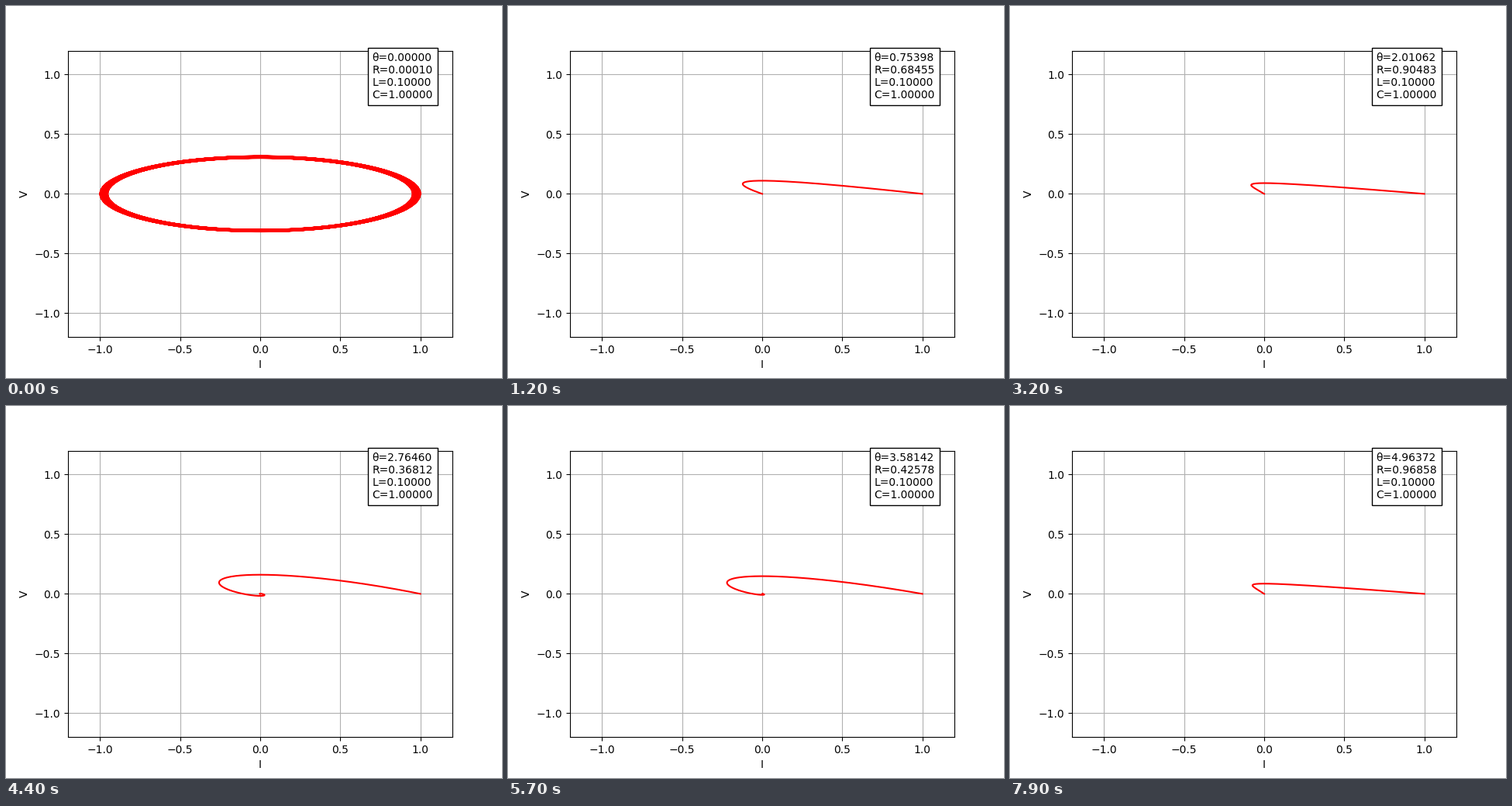
Animation of 640x480 px, one loop 8 s. Source, as a matplotlib script:

```python
import matplotlib.pyplot as plt
import numpy as np
from matplotlib.animation import FuncAnimation

FRAMES = 80
STEP = 2 * np.pi / 100
L, C = 0.1, 1.0
R_MIN = 1e-4
T = np.linspace(0, 100, 10001)


def discharge(r):
    """Current and capacitor voltage of a series RLC loop, from I=1, V=0."""
    a = r / (2 * L)
    s = np.sqrt(complex(a * a - 1 / (L * C)))
    p, q = -a + s, -a - s
    ep, eq = np.exp(p * T), np.exp(q * T)
    current = (p * ep - q * eq) / (p - q)
    voltage = (ep - eq) / (C * (p - q))
    return current.real, voltage.real


fig, ax = plt.subplots(figsize=(6.4, 4.8), dpi=100)
ax.set(xlim=(-1.2, 1.2), ylim=(-1.2, 1.2), xlabel="I", ylabel="V")
ticks = np.arange(-1, 1.1, 0.5)
ax.set_xticks(ticks)
ax.set_yticks(ticks)
ax.grid()
curve, = ax.plot([], [], color="red")
info = ax.text(0.7, 0.8, "", bbox=dict(facecolor="white", edgecolor="black"))


def update(i):
    theta = i * STEP
    r = max(abs(np.sin(theta)), R_MIN)
    curve.set_data(*discharge(r))
    info.set_text(f"θ={theta:.5f}\nR={r:.5f}\nL={L:.5f}\nC={C:.5f}")
    return curve, info


anim = FuncAnimation(fig, update, frames=FRAMES, interval=100,
                     init_func=lambda: update(0), repeat=True, repeat_delay=0)
plt.show()
```
